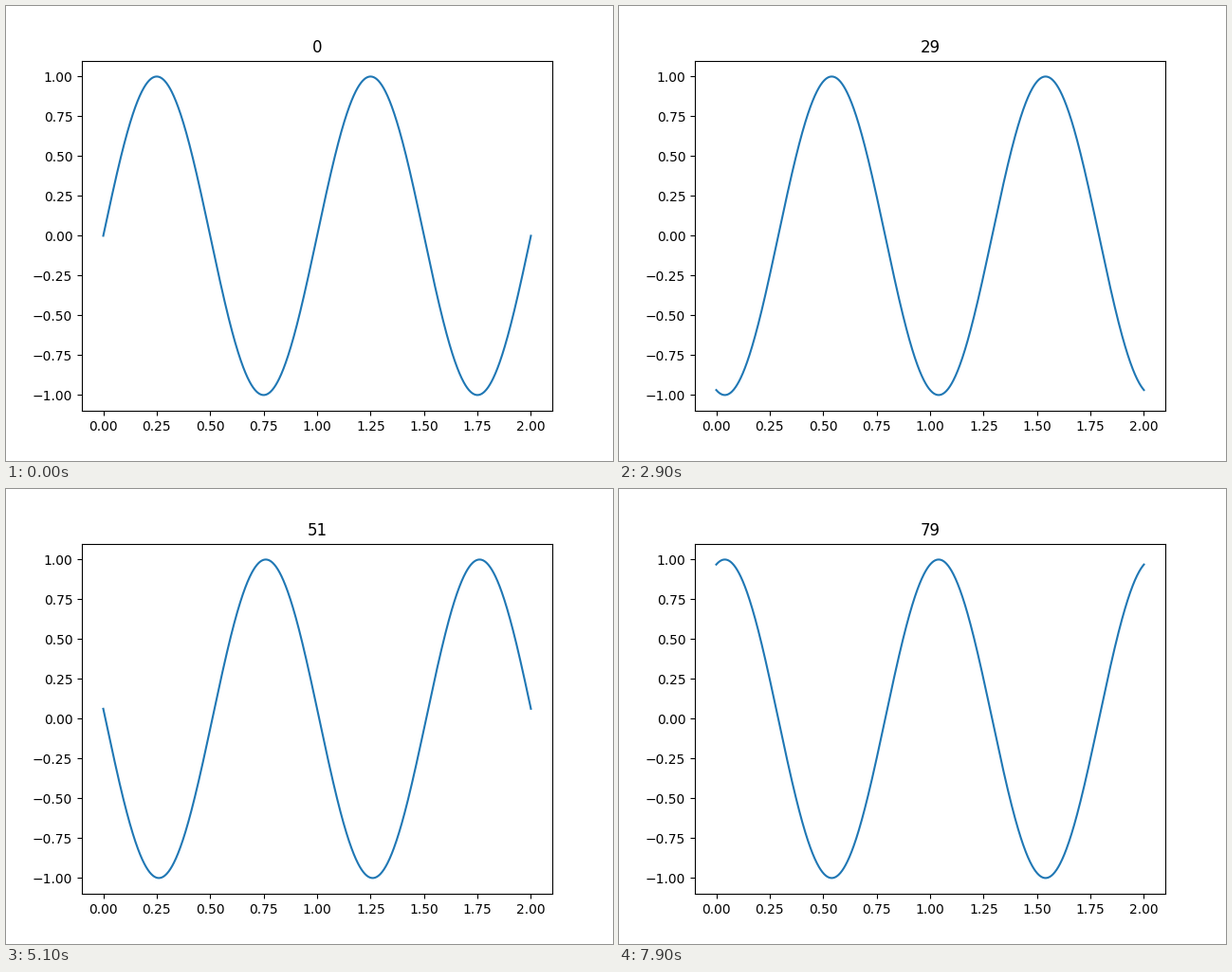
Animation, 640 px wide and 480 px high, one loop 8 s. Source, as a matplotlib script:

```python
import matplotlib.pyplot as plt
import numpy as np
from matplotlib.animation import FuncAnimation

FRAMES = 80
INTERVAL = 100  # ms
SPEED = 0.01    # wave shift per frame, in x units

x = np.linspace(0, 2, 1000)


def wave(i):
    return np.sin(2 * np.pi * (x - SPEED * i))


fig, ax = plt.subplots(figsize=(6.4, 4.8), dpi=100)
ax.set_xlim(-0.1, 2.1)
ax.set_ylim(-1.1, 1.1)
line, = ax.plot(x, wave(0), color="C0", lw=1.5)
title = ax.set_title("0")


def update(i):
    line.set_ydata(wave(i))
    title.set_text(str(i))
    return line, title


anim = FuncAnimation(fig, update, frames=FRAMES, interval=INTERVAL,
                     repeat=True, repeat_delay=0, blit=False)
plt.show()
```
